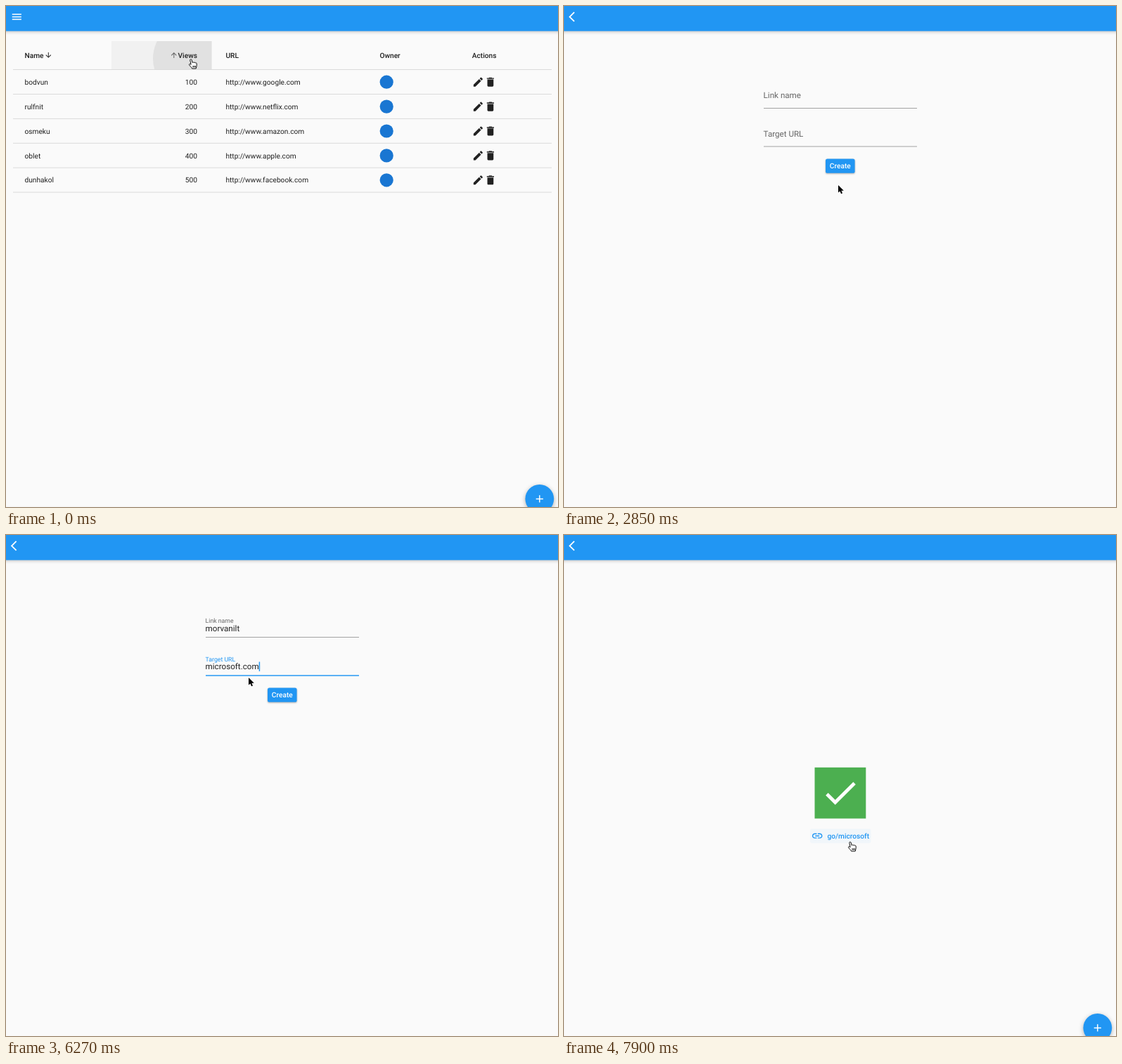
Animation, 785 px wide and 713 px high, one loop 8000 ms. Source, as an HTML page:

```html
<!DOCTYPE html>
<html lang="en">
<head>
<meta charset="utf-8">
<title>Link manager</title>
<style>
  html, body { margin: 0; width: 100%; height: 100%; overflow: hidden; background: #fafafa; }
  svg { display: block; width: 785px; height: 713px; }
  text { font: 10.18px Roboto, sans-serif; fill: #212121; text-rendering: geometricPrecision; white-space: pre; }
  .head, .btn, .go { font-weight: 500; }
  .btn { fill: #fff; }
  .go { fill: #2196f3; }
  .input { font-size: 11.63px; }
  .end { text-anchor: end; }
  .mid { text-anchor: middle; }
  .bar { fill: #2196f3; filter: drop-shadow(0 1.5px 2px rgba(0,0,0,.25)); }
  .raised { fill: #2196f3; filter: drop-shadow(0 1.2px 1.3px rgba(0,0,0,.32)); }
  .fab { fill: #2196f3; filter: drop-shadow(0 2.5px 3px rgba(0,0,0,.3)); }
</style>
</head>
<body>
<svg id="stage" viewBox="0 0 785 713"></svg>
<script>
const DURATION = 8000;
const UNIT = 0.727;
const BLUE = '#2196f3';
const LINK_NAME = 'morvanilt';
const TARGET_URL = 'microsoft.com';

const ICON = {
  menu: 'M3 18h18v-2H3v2zm0-5h18v-2H3v2zm0-7v2h18V6H3z',
  back: 'M11.67 3.87L9.9 2.1 0 12l9.9 9.9 1.77-1.77L3.54 12z',
  up: 'M4 12l1.41 1.41L11 7.83V20h2V7.83l5.58 5.59L20 12l-8-8-8 8z',
  edit: 'M3 17.25V21h3.75L17.81 9.94l-3.75-3.75L3 17.25zM20.71 7.04c.39-.39.39-1.02 0-1.41l-2.34-2.34c-.39-.39-1.02-.39-1.41 0l-1.83 1.83 3.75 3.75 1.83-1.83z',
  trash: 'M6 19c0 1.1.9 2 2 2h8c1.1 0 2-.9 2-2V7H6v12zM19 4h-3.5l-1-1h-5l-1 1H5v2h14V4z',
  plus: 'M19 13h-6v6h-2v-6H5v-2h6V5h2v6h6v2z',
  check: 'M9 16.17L4.83 12l-1.42 1.41L9 19 21 7l-1.41-1.41z',
  link: 'M3.9 12c0-1.71 1.39-3.1 3.1-3.1h4V7H7c-2.76 0-5 2.24-5 5s2.24 5 5 5h4v-1.9H7c-1.71 0-3.1-1.39-3.1-3.1zM8 13h8v-2H8v2zm9-6h-4v1.9h4c1.71 0 3.1 1.39 3.1 3.1s-1.39 3.1-3.1 3.1h-4V17h4c2.76 0 5-2.24 5-5s-2.24-5-5-5z'
};

const icon = (name, cx, cy, fill = '#212121', scale = UNIT, attrs = '') =>
  `<path d="${ICON[name]}" fill="${fill}" ${attrs} transform="translate(${cx} ${cy}) scale(${scale}) translate(-12 -12)"/>`;
const text = (x, y, str, cls = '', id = '') =>
  `<text x="${x}" y="${y}" class="${cls}" ${id && `id="${id}"`}>${str}</text>`;
const rect = (x, y, w, h, attrs = '') =>
  `<rect x="${x}" y="${y}" width="${w}" height="${h}" ${attrs}/>`;

const bar = rect(-5, -5, 796, 40.7, 'class="bar"');
const paper = rect(-5, -5, 796, 725, 'fill="#fafafa"');
const back = icon('back', 15.5, 15.4, '#fff');
const fab = id => `<circle cx="758.8" cy="701.4" r="20.4" class="fab"/>
  <circle id="${id}" cx="758.8" cy="701.4" r="20.4" fill="#fff" opacity="0"/>
  ${icon('plus', 758.8, 701.4, '#fff')}`;

const LINKS = [['bodvun', 'google'], ['rulfnit', 'netflix'], ['osmeku', 'amazon'],
  ['oblet', 'apple'], ['dunhakol', 'facebook']];

function tablePage() {
  const divider = i => rect(10, 90.1 + 34.9 * i, 766, 0.9, 'fill="#d8d8d8"');
  const rows = LINKS.map(([name, host], i) => {
    const cy = 108.2 + 34.9 * i, y = cy + 3.6;
    return text(26.5, y, name) + text(272, y, (i + 1) * 100, 'end') +
      text(312.4, y, `http://www.${host}.com`) +
      `<circle cx="541.2" cy="${cy}" r="9.6" fill="#1976d2"/>` +
      icon('edit', 671.4, cy) + icon('trash', 688.9, cy) + divider(i + 1);
  }).join('');
  return `${paper}
    ${rect(150, 50, 142.6, 40.4, 'id="hover" fill="#000"')}
    <circle id="ripple" cx="265" cy="75" clip-path="url(#cell)"/>
    ${bar}${icon('menu', 15.3, 15.4, '#fff')}
    ${text(26.5, 74.2, 'Name', 'head')}${text(272, 74.2, 'Views', 'head end')}
    ${text(312.4, 74.2, 'URL', 'head')}${text(531.4, 74.2, 'Owner', 'head')}${text(662.7, 74.2, 'Actions', 'head')}
    <g id="byName">${icon('up', 60.3, 69.9, '#212121', -0.485)}</g>
    ${icon('up', 238.8, 70, '#212121', 0.485, 'id="byViews"')}
    ${divider(0)}${rows}${fab('fabInk')}`;
}

const field = (id, top, label) => `<g id="${id}" transform="translate(0 ${top})">
  ${text(283.6, 31.2, label, 'label')}${text(283.6, 36.8, '', 'input')}
  <rect class="line" x="284" width="218"/>
  <rect class="caret" y="26" width="1.45" height="13.4" fill="${BLUE}"/></g>`;

const formPage = () => `${paper}${bar}${back}
  ${field('nameField', 100, 'Link name')}${field('urlField', 154.5, 'Target URL')}
  ${rect(372, 217.4, 41.6, 20.4, 'rx="2.6" class="raised"')}
  ${rect(372, 217.4, 41.6, 20.4, 'rx="2.6" fill="#fff" id="createInk"')}
  ${text(392.8, 231.3, 'Create', 'btn mid')}`;

const donePage = () => `${rect(-45, -5, 40, 725, 'fill="url(#edge)"')}${paper}${bar}${back}
  <path id="spinner" fill="none" stroke="${BLUE}" stroke-width="2.9"/>
  <g id="result">
    ${rect(356.5, 330.8, 72.8, 72.7, 'fill="#4caf50"')}${icon('check', 393, 367, '#fff', 2.424)}
    ${rect(350, 418, 86.5, 20.4, `id="goHover" rx="2.6" fill="${BLUE}"`)}
    ${icon('link', 360.2, 428.2, BLUE)}${text(374.5, 431.8, 'go/microsoft', 'go')}
    ${fab('fabInk2')}
  </g>`;

const cursors = `
  <path id="arrow" d="M0 0V10.6L2.4 8.4 4.1 12.2 6 11.4 4.4 7.7H7.8z" stroke="#fff" stroke-width=".9" paint-order="stroke"/>
  <path id="hand" d="M-2.2 1.2C-2.4-.4-.2-.7.2.9L1 4.5c.5-.9 1.9-.8 2.2.2.6-.8 1.8-.6 2.1.3.8-.4 1.8 0 1.9 1V8.7c0 1.6-.8 2.4-1 4.3H.6C0 11.3-2.4 9.6-3.4 7.8-4 6.4-2.4 5.9-.9 7.4zM2 9v2.4M3.7 9v2.4M5.3 9v2.4"
    fill="#fff" stroke="#000" stroke-width=".95" stroke-linejoin="round"/>
  <path id="beam" d="M-2.4-6Q0-6 0-4.6 0-6 2.4-6M0-4.6V4.6M-2.4 6Q0 6 0 4.6 0 6 2.4 6M-1.4 1.8H1.4" fill="none" stroke="#111" stroke-width="1.1"/>`;

document.getElementById('stage').innerHTML = `
  <defs>
    <clipPath id="cell">${rect(150, 50, 142.6, 40.4)}</clipPath>
    <linearGradient id="edge">
      <stop offset="0" stop-opacity="0"/><stop offset=".4" stop-opacity=".03"/>
      <stop offset=".7" stop-opacity=".08"/><stop offset="1" stop-opacity=".25"/>
    </linearGradient>
  </defs>
  <g>${tablePage()}</g><g id="form">${formPage()}</g><g id="done">${donePage()}</g>${cursors}`;

const $ = id => document.getElementById(id);
const set = (el, attrs) => { for (const k in attrs) el.setAttribute(k, attrs[k]); };
const show = (el, on) => { el.style.display = on ? '' : 'none'; };

// Step tables: [start time, ...values], each held until the next entry.
const CURSOR = [
  [0, 'hand', 264, 76], [1050, 'arrow', 292, 112], [1200, 'arrow', 395, 245], [1350, 'arrow', 530, 400],
  [1500, 'arrow', 647, 527], [1650, 'arrow', 725, 646], [1800, 'arrow', 741, 679], [1950, 'hand', 745, 688],
  [2400, 'hand', 753, 698], [2550, 'arrow', 754, 699], [2700, 'arrow', 620, 540], [2850, 'arrow', 390, 255],
  [3000, 'arrow', 273, 114], [3150, 'beam', 298, 126], [3300, 'beam', 311, 133], [4200, 'beam', 314, 148],
  [4350, 'beam', 320, 170], [4500, 'beam', 323, 180], [6270, 'arrow', 345, 203], [6410, 'hand', 378, 220],
  [6560, 'hand', 388, 227], [6860, 'arrow', 388, 226], [7610, 'arrow', 395, 262], [7760, 'arrow', 411, 375],
  [7900, 'hand', 408, 437]
];
const HEADER = [[0, 56, .065, .035], [150, 95, .06, .035], [300, 150, .03, .035], [450, 0, 0, .035], [1050, 0, 0, 0]];
const FORM_Y = [[0, 720], [2400, 640], [2550, 147.5], [2700, 22], [2850, 0]];
const DONE_X = [[0, 840], [6860, 345], [7010, 68], [7160, 0]];
const FAB_INK = [[0, 0], [1950, .06], [2100, .14], [2250, .2], [2400, .12]];
const CREATE_INK = [[0, 0], [6410, .08], [6710, .22], [6860, .1]];
// Values: label float, focused, characters
const NAME_FIELD = [[0, 0, 0, 0], [3600, .6, 1, 0], [3750, 1, 1, 0], [4050, 1, 1, 9], [4650, 1, 0, 9]];
const URL_FIELD = [[0, 0, 0, 0], [4650, .6, 1, 0], [4800, 1, 1, 0], [4930, 1, 1, 5], [5080, 1, 1, 9],
  [5680, 1, 1, 10], [5830, 1, 1, 11], [5980, 1, 1, 13]];

const at = (table, t) => table.findLast(row => row[0] <= t).slice(1);

function drawField(id, value, [lift, focus, chars]) {
  const el = $(id), [label, input] = el.querySelectorAll('text');
  label.setAttribute('y', 31.2 - 5.9 * lift);
  label.style.fontSize = 11.63 - 2.91 * lift + 'px';
  label.style.fill = focus ? BLUE : '#666';
  input.textContent = value.slice(0, chars);
  set(el.querySelector('.line'), focus
    ? { y: 44.8, height: 1.45, fill: BLUE } : { y: 45, height: 0.9, fill: '#999' });
  const caret = el.querySelector('.caret');
  show(caret, focus);
  caret.setAttribute('x', 283.7 + (chars ? input.getComputedTextLength() : 0));
}

function drawSpinner(from, to) {
  const point = deg => {
    const a = deg * Math.PI / 180;
    return `${393 + 11.6 * Math.cos(a)} ${383 + 11.6 * Math.sin(a)}`;
  };
  $('spinner').setAttribute('d', `M${point(from)}A11.6 11.6 0 0 1 ${point(to)}`);
}

function draw(t) {
  const [r, ink, hover] = at(HEADER, t);
  set($('ripple'), { r, opacity: ink });
  set($('hover'), { opacity: hover });
  show($('byName'), t < 150);
  set($('byViews'), { opacity: t < 150 ? .65 : 1 });
  set($('fabInk'), { opacity: at(FAB_INK, t)[0] });

  set($('form'), { transform: `translate(0 ${at(FORM_Y, t)[0]})` });
  drawField('nameField', LINK_NAME, at(NAME_FIELD, t));
  drawField('urlField', TARGET_URL, at(URL_FIELD, t));
  set($('createInk'), { opacity: at(CREATE_INK, t)[0] });

  set($('done'), { transform: `translate(${at(DONE_X, t)[0]} 0)` });
  show($('done'), t >= 6860);
  show($('spinner'), t < 7160);
  show($('result'), t >= 7160);
  drawSpinner(-80, t < 7010 ? -60 : 30);
  set($('goHover'), { opacity: t >= 7900 ? .04 : 0 });

  const [kind, x, y] = at(CURSOR, t);
  for (const id of ['arrow', 'hand', 'beam']) show($(id), id === kind);
  set($(kind), { transform: `translate(${x} ${y})` });
}

const start = performance.now();
function tick() {
  draw((performance.now() - start) % DURATION);
  requestAnimationFrame(tick);
}
tick();
</script>
</body>
</html>
```
